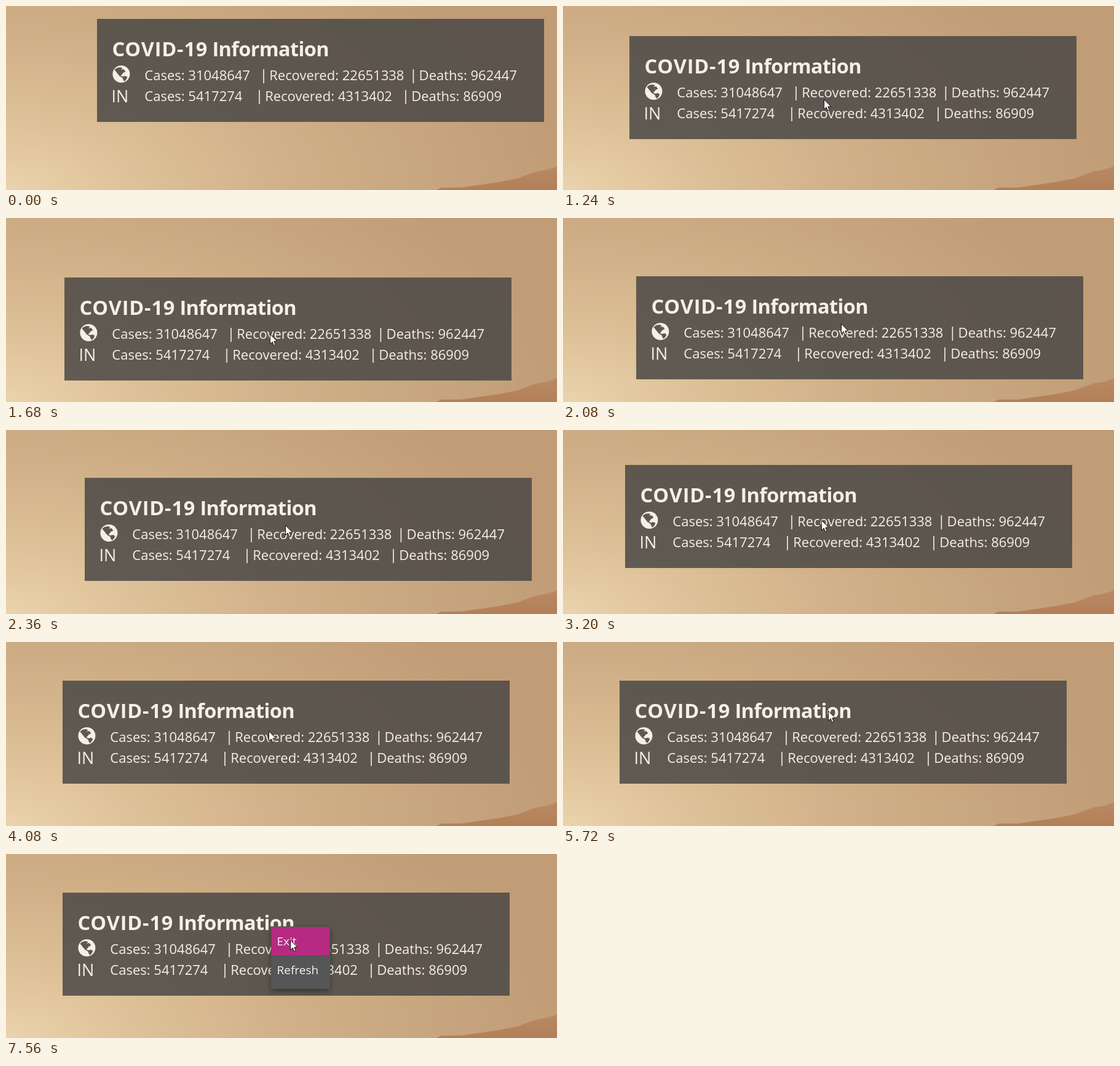
An HTML page that plays this animation: 896x300 px, repeating every 8000 ms.

```html
<!DOCTYPE html>
<html lang="en">
<head>
<meta charset="utf-8">
<title>Desktop widget</title>
<style>
  html, body { margin: 0; width: 100%; height: 100%; overflow: hidden; }
  svg { display: block; width: 896px; height: 300px; }
  text { font: 22px "Open Sans", "Noto Sans", sans-serif; fill: #f5efe6; }
  .title { font-size: 32.5px; font-weight: 700; }
  .wide { letter-spacing: .025em; }
  .tight { letter-spacing: -.02em; }
  .code { font-size: 27px; }
  .item { font-size: 19px; fill: #f4f2f3; }
  #menu { filter: drop-shadow(0 4px 4px rgba(0, 0, 0, .4)); }
</style>
</head>
<body>
<svg viewBox="0 0 896 300">
  <defs>
    <radialGradient id="sky" gradientUnits="userSpaceOnUse" cx="0" cy="0" r="1"
      gradientTransform="translate(0 300) scale(900 470)">
      <stop offset="0" stop-color="#ead3ad"/>
      <stop offset=".22" stop-color="#dfc299"/>
      <stop offset=".48" stop-color="#d2b28a"/>
      <stop offset=".75" stop-color="#c8a67f"/>
      <stop offset="1" stop-color="#c09d77"/>
    </radialGradient>
    <linearGradient id="hill" x1="0" y1="0" x2="0" y2="1">
      <stop offset="0" stop-color="#b98a64"/>
      <stop offset="1" stop-color="#b27f58"/>
    </linearGradient>
  </defs>

  <rect width="896" height="300" fill="url(#sky)"/>
  <path fill="url(#hill)" d="M700 300L708 296 740 296 768 292 802 287 832 281 850 274 866 269 881 267 896 261V300Z"/>

  <g id="panel">
    <rect width="727" height="168" fill="#4b4846" fill-opacity=".85"/>
    <text class="title wide" x="24.5" y="61">COVID-19</text>
    <text class="title tight" x="187.5" y="61">Information</text>
    <g transform="translate(39.4 90)">
      <circle r="14" fill="#f5efe6"/>
      <path fill="#5e564f" d="M-11-7L-7-10-2-11 2-10 0-7 4-8 7-4 3-2 1 1-1 2 2 4 7 3 10 5 8 9 5 12 3 9 2 6-3 3-7-2Z"/>
    </g>
    <text class="code" x="23.6" y="136">IN</text>
  </g>

  <g id="menu">
    <rect x="431" y="118" width="96" height="102" fill="#555657"/>
    <rect id="hover" x="432" y="119" width="94" height="46" fill="#b62a82"/>
    <text class="item" x="440.5" y="149">Exit</text>
    <text class="item" x="440.5" y="196">Refresh</text>
  </g>

  <path id="cursor" fill="#fff" stroke="#111" stroke-width="1"
    d="M.5.5V16.5L4.2 13 6.7 18.8 9.2 17.7 6.8 12H11.8Z"/>
</svg>

<script>
const LOOP = 8000;
const CURSOR_SHOWN = 160;
const DRAG = { from: 640, to: 3240, lag: 120, gripX: 327, gripY: 85 };
const MENU = { opens: 6040, top: 119 };
const $ = id => document.getElementById(id);

// Points the hand passes through: time, x, y
const hand = [
  [160, 476, 107], [640, 475, 106], [1120, 435, 134], [1240, 424, 152],
  [1560, 422, 182], [1680, 429, 189], [2240, 455, 163], [2680, 446, 138],
  [2960, 436, 138], [3240, 419, 148], [3700, 419, 148], [4080, 427, 145],
  [4500, 437, 139], [5320, 433, 117], [5720, 431, 112], [7160, 431, 112], [7560, 462, 140]
];

function add(tag, attrs, label = "") {
  const node = document.createElementNS("http://www.w3.org/2000/svg", tag);
  for (const key in attrs) node.setAttribute(key, attrs[key]);
  node.textContent = label;
  $("panel").append(node);
}

function addRow(y, cases, recovered, recoveredX, deaths, deathsX) {
  add("text", { x: 77.3, y }, "Cases: " + cases);
  for (const [x, label] of [[recoveredX, "Recovered: " + recovered], [deathsX, "Deaths: " + deaths]]) {
    add("rect", { x: x - 10, y: y - 18, width: 1.6, height: 23, fill: "#f5efe6" });
    add("text", { x, y }, label);
  }
}
addRow(100, 31048647, 22651338, 280.2, 962447, 523.6);
addRow(134, 5417274, 4313402, 273.2, 86909, 511.2);

// The screen refreshes in an uneven rhythm: 120, 40, 120 ms
function snap(time) {
  const phase = time % 280;
  return time - phase + (phase < 120 ? 0 : phase < 160 ? 120 : 160);
}

const clamp = (value, low, high) => Math.min(high, Math.max(low, value));

// Smooth curve through the points that never overshoots them
function slope(i, axis) {
  const rate = j => (hand[j + 1][axis] - hand[j][axis]) / (hand[j + 1][0] - hand[j][0]);
  if (i === 0 || i === hand.length - 1) return 0;
  const before = rate(i - 1), after = rate(i);
  return before * after > 0 ? 2 * before * after / (before + after) : 0;
}

function handAt(time) {
  const t = clamp(time, hand[0][0], hand.at(-1)[0]);
  const i = Math.max(1, hand.findIndex(point => point[0] >= t));
  const a = hand[i - 1], b = hand[i];
  const span = b[0] - a[0], k = (t - a[0]) / span;
  const ease = k * k * (3 - 2 * k);
  return [1, 2].map(axis => Math.round(
    a[axis] + (b[axis] - a[axis]) * ease
    + span * k * (1 - k) * ((1 - k) * slope(i - 1, axis) - k * slope(i, axis))
  ));
}

// The dragged panel trails the hand by one refresh
function panelAt(time) {
  const [x, y] = handAt(clamp(time - DRAG.lag, DRAG.from, DRAG.to));
  return [x - DRAG.gripX, y - DRAG.gripY];
}

const place = (id, point) => $(id).setAttribute("transform", `translate(${point})`);
const show = (id, on) => $(id).setAttribute("visibility", on ? "visible" : "hidden");

const start = performance.now();
function draw(now) {
  const time = snap(Math.max(0, now - start) % LOOP);
  const pointer = handAt(time);
  const open = time >= MENU.opens;
  place("panel", panelAt(time));
  place("cursor", pointer);
  show("cursor", time >= CURSOR_SHOWN);
  show("menu", open);
  show("hover", open && pointer[1] >= MENU.top);
  requestAnimationFrame(draw);
}
draw(start);
</script>
</body>
</html>
```
